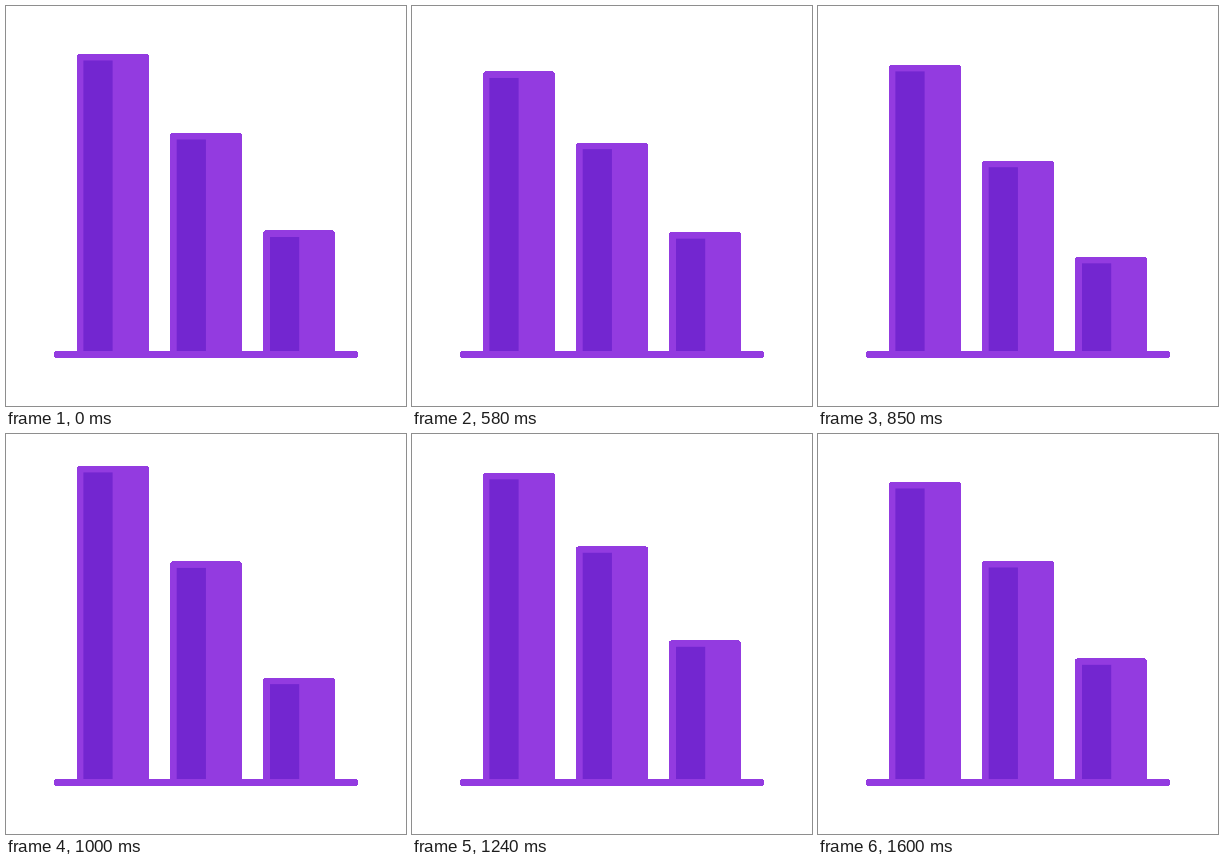
An HTML page that plays this animation: 400 px wide and 400 px high, repeating every 1630 ms.

```html
<!DOCTYPE html>
<html lang="en">
<head>
<meta charset="utf-8">
<title>Bar chart</title>
<style>
  html, body { margin: 0; width: 100%; height: 100%; overflow: hidden; background: #fff; }
  svg { display: block; width: 100vw; height: 100vh; }
  .solid { fill: #933be0; shape-rendering: crispEdges; }
  .shade { fill: #7326d0; }
</style>
</head>
<body>
<svg id="chart" viewBox="0 0 400 400"></svg>
<script>
const LOOP = 1630, START = 430, STEP = 30;
const BASE = 348, GAP = 93.3, EDGE = 6.6;

// Each bar dips, overshoots, then settles.
const bars = [
  { rest: 47.9, dip: 27.6, rise: 19.2 },
  { rest: 126.9, dip: 30.7, rise: 17.8 },
  { rest: 224.4, dip: 27.8, rise: 18.4 }
];

const chart = document.getElementById('chart');

function rect(kind, x, y, width, height, rx = 0) {
  const el = document.createElementNS('http://www.w3.org/2000/svg', 'rect');
  const attrs = { class: kind, x, y, width, height, rx };
  for (const name in attrs) el.setAttribute(name, attrs[name]);
  return chart.appendChild(el);
}

bars.forEach((bar, i) => {
  bar.lag = i ** 1.15;
  bar.body = rect('solid', 71 + 93 * i, 0, 72, 0, 3.2);
  bar.shade = rect('shade', 77.4 + GAP * i, 0, 29.2, 0);
});
rect('solid', 48, 345, 304, 7, 3.3);

// Smooth step from 0 to 1 between two times
function ease(t, from, to) {
  const u = Math.min(1, Math.max(0, (t - from) / (to - from)));
  return u * u * (3 - 2 * u);
}

function topAt({ rest, dip, rise, lag }, t) {
  const start = 390 + 60 * lag;
  const low = 712 + 86 * lag;
  const high = 1054 + 90 * lag;
  const end = 1415 + 93 * lag;
  return rest + dip * ease(t, start, low)
    - (dip + rise) * ease(t, low, high)
    + rise * ease(t, high, end);
}

function setTop(el, top) {
  el.setAttribute('y', top);
  el.setAttribute('height', BASE - top);
}

function draw(ms) {
  const t = ms % LOOP;
  const pose = t < START ? 0 : START + Math.floor((t - START) / STEP) * STEP;
  for (const bar of bars) {
    const top = topAt(bar, pose);
    setTop(bar.body, top);
    setTop(bar.shade, top + EDGE);
  }
  // The baseline stays above the bars because it is drawn last.
}

const origin = performance.now();
function tick() {
  draw(performance.now() - origin);
  requestAnimationFrame(tick);
}
tick();
</script>
</body>
</html>
```
